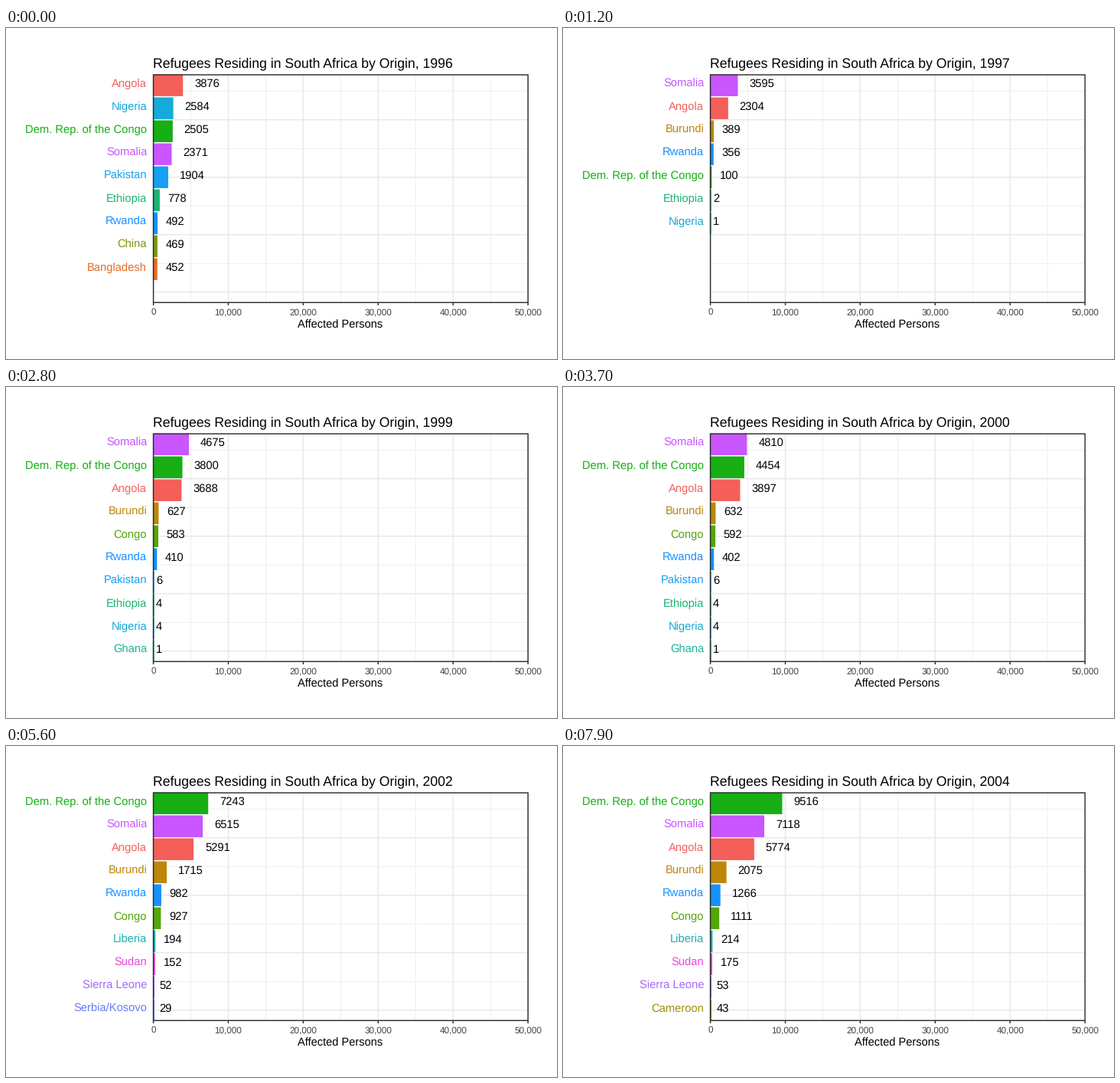
A matplotlib script that plays this animation: 720 px wide and 432 px high, repeating every 8000 ms.

```python
import matplotlib.pyplot as plt
from matplotlib.animation import FuncAnimation
from matplotlib.patches import Rectangle

plt.rcParams.update({
    "font.family": "Liberation Sans",
    "text.hinting": "none",
    "toolbar": "None",
})

W, H, DPI = 720, 432, 72          # at 72 dpi one point is one pixel
LEFT, RIGHT, TOP, BOTTOM = 192.6, 682.1, 61.1, 358.3
SCALE = (RIGHT - LEFT) / 50000
ROW, BAR_H, STROKE = 30, 27, 1.42
TEXT = 14.7
FRAMES, PERIOD, REST = 80, 9.25, 5
INK, GRID = "#2b2b2b", "#e8e8e8"

# Colour, first key year with data, and the values from there on.
KEY_YEARS = [1996, 1997, 1998, 2000, 2001, 2002, 2004]
COUNTRIES = {
    "Angola": ("#f55f5a", 1996, [3876, 2304, 2502, 3897, 4752, 5291, 5774]),
    "Bangladesh": ("#e56c25", 1996, [452]),
    "Burundi": ("#bc870a", 1997, [389, 601, 632, 1439, 1715, 2075]),
    "Cameroon": ("#9a9108", 2004, [43]),
    "China": ("#7b9a07", 1996, [469]),
    "Congo": ("#53a609", 1998, [531, 592, 811, 927, 1111]),
    "Dem. Rep. of the Congo":
        ("#17af14", 1996, [2505, 100, 95, 4454, 4993, 7243, 9516]),
    "Ethiopia": ("#1ab573", 1996, [778, 2, 2, 4]),
    "Ghana": ("#1bb592", 2000, [1]),
    "Liberia": ("#18b0b0", 2001, [165, 194, 214]),
    "Nigeria": ("#15abd8", 1996, [2584, 1, 4, 4]),
    "Pakistan": ("#16a0f5", 1996, [1904, 0, 5, 6]),
    "Rwanda": ("#1591ff", 1996, [492, 356, 455, 402, 820, 982, 1266]),
    "Serbia/Kosovo": ("#667efb", 2001, [27, 29]),
    "Sierra Leone": ("#a26afa", 2001, [41, 52, 53]),
    "Somalia": ("#c956ff", 1996, [2371, 3595, 3910, 4810, 5336, 6515, 7118]),
    "Sudan": ("#eb47de", 2001, [120, 152, 175]),
}
YEARS = range(KEY_YEARS[0], KEY_YEARS[-1] + 1)
STARTS = [round(PERIOD * k) for k in range(len(YEARS) + 1)]


def persons(name, year):
    """Value in a year; a year without data leans towards the next key year."""
    _, first, values = COUNTRIES[name]
    if year not in KEY_YEARS:
        return round(0.15 * persons(name, year - 1)
                     + 0.85 * persons(name, year + 1))
    i = KEY_YEARS.index(year) - KEY_YEARS.index(first)
    return values[i] if 0 <= i < len(values) else 0


def ranking(year):
    """Map the ten largest countries to (rank, value)."""
    values = {n: persons(n, year) for n in COUNTRIES}
    order = sorted((n for n in values if values[n]), key=lambda n: -values[n])
    return {n: (i + 1, values[n]) for i, n in enumerate(order[:10])}


RANKS = [ranking(y) for y in YEARS]

fig = plt.figure(figsize=(W / DPI, H / DPI), dpi=DPI, facecolor="white")
ax = fig.add_axes([0, 0, 1, 1])
ax.set_xlim(0, W)
ax.set_ylim(H, 0)
ax.axis("off")


def row_y(rank):
    return 44.75 + ROW * rank


def line(xs, ys, color, width):
    ax.plot(xs, ys, color=color, lw=width, solid_capstyle="butt",
            snap=False, zorder=1)


def box(x, y, w, h, z, **style):
    return ax.add_patch(Rectangle((x, y), w, h, lw=STROKE, snap=False,
                                  joinstyle="miter", zorder=z, **style))


def text(x, y, s, size=TEXT, color="black", ha="left"):
    return ax.text(x, y, s, fontsize=size, color=color, ha=ha,
                   va="baseline", zorder=4)


# Minor grid lines sit halfway between the major ones.
for minor in (True, False):
    width = STROKE / 2 if minor else STROKE
    for i in range(5):
        x = LEFT + (10000 * i + 5000 * minor) * SCALE
        line([x, x], [TOP, BOTTOM], GRID, width)
    for i in range(1, 5):
        y = row_y(2.5 * i - 1.25 * minor)
        line([LEFT, RIGHT], [y, y], GRID, width)

for i in range(6):
    x = LEFT + 10000 * i * SCALE
    line([x, x], [BOTTOM, BOTTOM + 3.7], INK, STROKE)
    text(x, 374, f"{10000 * i:,}", 11.73, "#434343", "center")

box(LEFT, TOP, RIGHT - LEFT, BOTTOM - TOP, 3, fill=False, ec=INK)
text((LEFT + RIGHT) / 2 - 0.5, 392, "Affected Persons", 14.67, ha="center")
title = text(192, 51, "", 17.6)

items = {
    name: (box(LEFT, 0, 0, BAR_H, 2, fc=color, ec=color),
           text(184.2, 0, name, color=color, ha="right"),
           text(0, 0, ""))
    for name, (color, _, _) in COUNTRIES.items()
}


def place(name, rank, value, label):
    bar, tag, number = items[name]
    y = row_y(rank)
    end = LEFT + value * SCALE
    bar.set_y(y - BAR_H / 2)
    bar.set_width(end - LEFT)
    tag.set_y(y + 2.2)
    # The number starts about half its own width beyond the bar.
    number.set_position((end + len(label) * 0.278 * TEXT - 0.8, y + 2.2))
    number.set_text(label)


def update(frame):
    k = max(i for i in range(len(YEARS)) if STARTS[i] <= frame)
    begin = STARTS[k] + REST
    t = max(0, (frame - begin) / (STARTS[k + 1] - begin))
    if k == len(YEARS) - 1:
        t = 0
    now = RANKS[k]
    after = RANKS[k + 1] if t else now
    title.set_text(f"Refugees Residing in South Africa by Origin, {YEARS[k]}")
    for name, parts in items.items():
        # Leavers go when a move begins, newcomers appear when it ends.
        shown = name in now and name in after
        for part in parts:
            part.set_visible(shown)
        if shown:
            (r0, v0), (r1, v1) = now[name], after[name]
            place(name, r0 + (r1 - r0) * t, v0 + (v1 - v0) * t,
                  str(v0 if t < 0.5 else v1))
    return []


anim = FuncAnimation(fig, update, frames=FRAMES, interval=100,
                     repeat=True, repeat_delay=0, blit=False)
plt.show()
```
